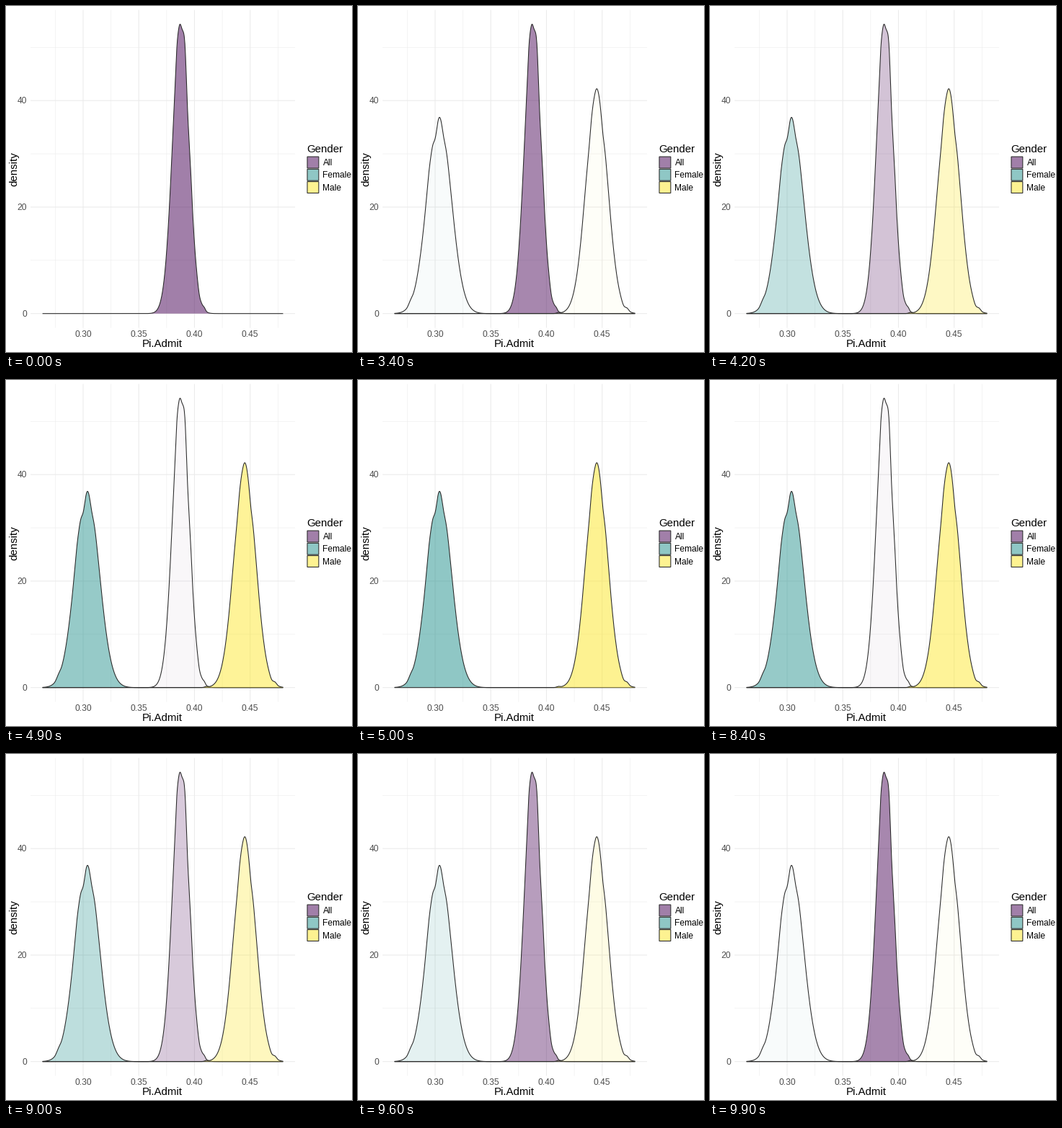
A matplotlib script for the animation above (10 s loop, 480 px wide and 480 px high).

```python
import numpy as np
import matplotlib.pyplot as plt
from matplotlib.animation import FuncAnimation

plt.rcParams["font.family"] = "Liberation Sans"

SIZE, DPI = 480, 72            # at 72 dpi one point is one pixel
FRAMES, INTERVAL = 100, 100
LEFT, RIGHT, TOP, BOTTOM = 34, 401, 5.5, 446.5
TITLE, LABEL = 15, 12
LINE = 1.07
INK, GREY, GRID = "#2B2B2B", "#4D4D4D", "#EBEBEB"
KEY = 17.28
RIPPLE_WIDTH = 0.15            # in standard deviations

# name, colour, admitted, applicants, ripples as (position in sd, share of peak)
GROUPS = [
    ("All", "#440154", 1755, 4526,
     [(-0.5, 0.022), (0.1, -0.022), (0.52, 0.04), (0.85, -0.018),
      (1.2, 0.016), (2.3, -0.008), (2.9, 0.007)]),
    ("Female", "#21908C", 557, 1835,
     [(-2.4, 0.012), (-0.9, 0.02), (-0.3, -0.064), (0.38, -0.037)]),
    ("Male", "#FDE725", 1198, 2691,
     [(-3.6, 0.004), (-0.76, -0.022), (0, 0.014), (0.55, -0.038),
      (2.5, -0.006), (2.85, 0.008)]),
]


def x_pixel(rate):
    return 107 + (rate - 0.30) * 1544.5


def y_pixel(density):
    return 426.7 - density * 7.388


def bell(z):
    return np.exp(-z * z / 2)


def posterior(rates, admitted, applicants, ripples):
    """Normal density of an admission rate, with small sampling ripples."""
    mean = admitted / applicants
    sd = np.sqrt(mean * (1 - mean) / applicants)
    z = (rates - mean) / sd
    shape = bell(z) + sum(share * bell((z - at) / RIPPLE_WIDTH)
                          for at, share in ripples)
    return np.maximum(shape, 0) / (sd * np.sqrt(2 * np.pi))


fig = plt.figure(figsize=(SIZE / DPI, SIZE / DPI), dpi=DPI, facecolor="white")
ax = fig.add_axes([0, 0, 1, 1])
ax.set(xlim=(0, SIZE), ylim=(SIZE, 0))
ax.axis("off")


def grid(rates, densities, width):
    style = dict(color=GRID, lw=width, snap=False, zorder=1,
                 solid_capstyle="butt")
    for x in map(x_pixel, rates):
        ax.plot([x, x], [TOP, BOTTOM], **style)
    for y in map(y_pixel, densities):
        ax.plot([LEFT, RIGHT], [y, y], **style)


def write(x, y, text, size, color="black", ha="left", rotation=0):
    ax.text(x, y, text, fontsize=size, color=color, ha=ha, va="baseline",
            rotation=rotation, rotation_mode="anchor")


x_ticks, y_ticks = 0.30 + 0.05 * np.arange(4), range(0, 60, 20)
grid(0.275 + 0.05 * np.arange(5), range(10, 60, 20), LINE / 2)
grid(x_ticks, y_ticks, LINE)

for rate in x_ticks:
    write(x_pixel(rate), 459, f"{rate:.2f}", LABEL, GREY, "center")
for density in y_ticks:
    write(29, y_pixel(density) + 4.2, str(density), LABEL, GREY, "right")
write(216.8, 473, "Pi.Admit", TITLE, ha="center")
write(15, 226.5, "density", TITLE, ha="center", rotation=90)
write(416.8, 203, "Gender", TITLE)

rates = np.linspace(0.2635, 0.4796, 900)
x, base = x_pixel(rates), y_pixel(0)
layers = []
for k, (name, color, *counts) in enumerate(GROUPS):
    middle = 217 + KEY * k
    side = KEY - 1.42
    corner = (425.9 - side / 2, middle - side / 2)
    ax.add_patch(plt.Rectangle(corner, side, side, fc=color, alpha=0.5, lw=0,
                               snap=False))
    ax.add_patch(plt.Rectangle(corner, side, side, fill=False, ec=INK,
                               lw=LINE, snap=False))
    write(439.5, middle + 4.2, name, LABEL)

    y = y_pixel(posterior(rates, *counts))
    area = ax.fill_between(x, y, base, fc=color, lw=0, snap=False,
                           zorder=3 + 2 * k)
    outline, = ax.plot(x, y, color=INK, lw=LINE, snap=False,
                       solid_capstyle="butt", zorder=4 + 2 * k)
    layers.append((area, outline))


def update(frame):
    split = np.interp(frame, [0, 33, 50, 83, 100], [0, 0, 1, 1, 0])
    for (area, outline), amount in zip(layers, (1 - split, split, split)):
        area.set_alpha(0.5 * amount)
        area.set_visible(amount > 0)
        outline.set_visible(amount > 0)
    return [artist for pair in layers for artist in pair]


animation = FuncAnimation(fig, update, frames=FRAMES, interval=INTERVAL,
                          repeat=True, repeat_delay=0)
plt.show()
```
